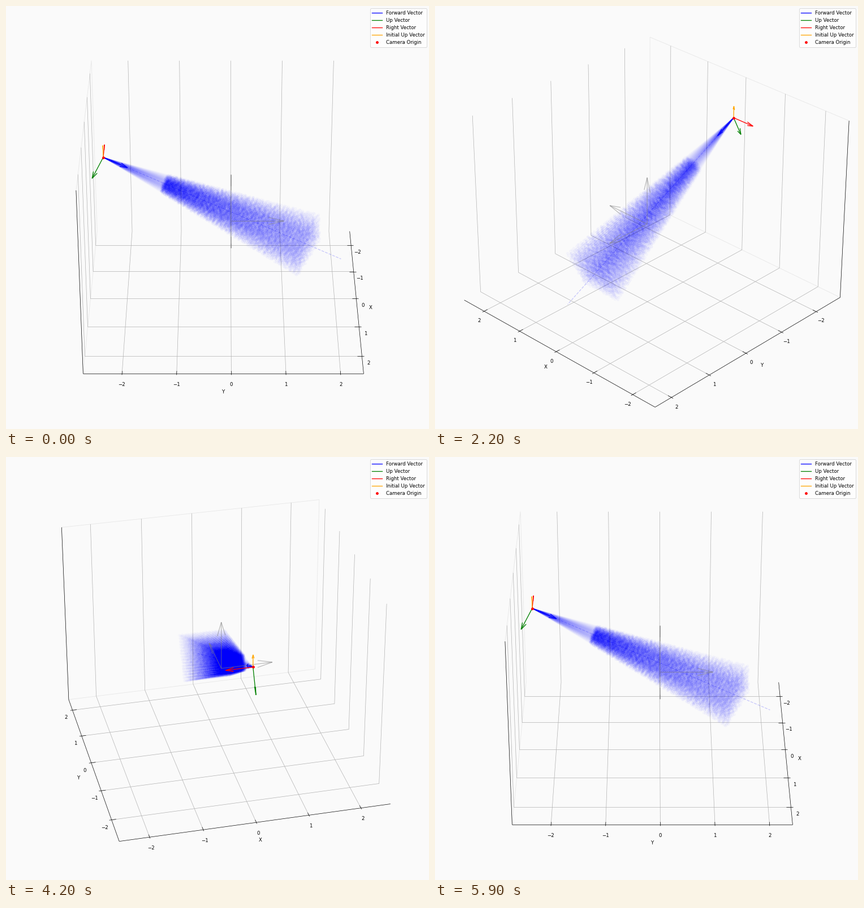
These frames come from a looping animation (748 px wide and 748 px high, 6 s). A matplotlib script:

```python
import numpy as np
import matplotlib.pyplot as plt
from matplotlib.animation import FuncAnimation
from matplotlib.collections import LineCollection

SIZE, FRAMES = 748, 60
plt.rcParams["font.family"] = "DejaVu Sans"

# View: perspective camera circling the plot box at a fixed elevation
ELEV = np.radians(30)
SCREEN = np.array([384.4, 365])
UNIT, DIST, FOCAL = 0.2415, 10, 3879
CENTER = np.array([0.005, -0.145, 0.19])
HALF = np.array([2.567, 2.567, 1.9255])
TICKS = range(-2, 3)
TICK_PAD, LABEL_PAD = 0.025, 0.0544

# Scene: a pinhole camera with its axes
ORIGIN = np.array([0, -2.381, 1.37])
FORWARD = np.array([0, 0.897, -0.442])
RIGHT = np.array([-1.0, 0, 0])
UP = np.array([0, -0.442, -0.897])
NEAR, FAR, SPREAD = 1.25, 4.3, 0.105
GRID, SAMPLES, BANDS = 16, 64, 4


def project(points, azim):
    """Return pixel positions and the distance from the viewer."""
    q = (np.asarray(points, float) - CENTER) * UNIT
    ca, sa = np.cos(azim), np.sin(azim)
    front = q[..., 0] * ca + q[..., 1] * sa
    right = q[..., 1] * ca - q[..., 0] * sa
    up = q[..., 2] * np.cos(ELEV) - front * np.sin(ELEV)
    depth = DIST - front * np.cos(ELEV) - q[..., 2] * np.sin(ELEV)
    xy = np.stack([right, -up], -1) * (FOCAL / depth)[..., None]
    return SCREEN + xy, depth


def arrow(start, vec):
    """Shaft and two head strokes, as three segments."""
    vec = np.asarray(vec, float)
    tip = start + vec
    flat = np.hypot(vec[0], vec[1])
    axis = np.array([vec[1], -vec[0], 0]) / flat if flat else np.array([0, 1.0, 0])
    side = np.cross(axis, vec)
    c, s = np.cos(np.radians(15)), np.sin(np.radians(15))
    heads = [tip - 0.3 * (c * vec + k * s * side) for k in (1, -1)]
    return np.array([[start, tip], [tip, heads[0]], [tip, heads[1]]])


def make_rays():
    """Ray segments up to the near plane and jittered samples beyond it."""
    rng = np.random.default_rng(0)
    a = np.linspace(-SPREAD, SPREAD, GRID)
    u, v = (g.ravel()[:, None] for g in np.meshgrid(a, a))
    dirs = FORWARD + u * RIGHT + v * UP
    step = np.arange(SAMPLES) + rng.random((len(dirs), SAMPLES))
    t = NEAR + step / SAMPLES * (FAR - NEAR)
    samples = ORIGIN + dirs[:, None, :] * t[..., None]
    starts = np.broadcast_to(ORIGIN, dirs.shape)
    return np.stack([starts, ORIGIN + NEAR * dirs], 1), samples.reshape(-1, 3)


fig = plt.figure(figsize=(12, 12), dpi=SIZE / 12, facecolor="#fafafa")
ax = fig.add_axes([0, 0, 1, 1])
ax.set(xlim=(0, SIZE), ylim=(SIZE, 0))
ax.axis("off")


def lines(color, width, zorder, alpha=None, style="-"):
    coll = LineCollection([], colors=color, linewidths=width, zorder=zorder,
                          alpha=alpha, linestyles=style)
    ax.add_collection(coll, autolim=False)
    return coll


pane = lines("#e6e6e6", 0.9, 1)
grid = lines("#b0b0b0", 0.8, 1.1)
spines = lines("black", 0.8, 1.2)
tick_marks = lines("black", 0.8, 1.3)
tick_texts = [[ax.text(0, 0, str(v).replace("-", "\u2212"), ha="center",
                       va="top", fontsize=10) for v in TICKS] for _ in "XY"]
axis_names = [ax.text(0, 0, s, ha="center", va="center", fontsize=10) for s in "XY"]

ray_segs, samples = make_rays()
rays = lines("blue", 1.5, 4, 0.02)
axis_ray = lines("blue", 1.5, 4.1, 0.2, "--")
axis_segs = np.array([[ORIGIN, ORIGIN + 5 * FORWARD]])

# Samples nearer to the viewer are more opaque
clouds = [ax.plot([], [], "o", color="blue", ms=20 ** 0.5, mew=1.5, zorder=5,
                  alpha=alpha)[0] for alpha in np.linspace(0.021, 0.012, BANDS)]

arrows = [(lines("gray", 1.5, 6, 0.5), arrow(np.zeros(3), v)) for v in np.eye(3)]
for color, vec in (("blue", FORWARD / 2), ("green", UP / 2),
                   ("red", RIGHT / 2), ("orange", [0, 0, 0.25])):
    arrows.append((lines(color, 1.5, 7), arrow(ORIGIN, vec)))
dot, = ax.plot([], [], "o", color="red", ms=20 ** 0.5, mew=1, zorder=8)

handles = [plt.Line2D([], [], color=c, lw=1.5)
           for c in ("blue", "green", "red", "orange")]
ax.legend(handles + [dot],
          ["Forward Vector", "Up Vector", "Right Vector",
           "Initial Up Vector", "Camera Origin"],
          loc="upper right", fontsize=10, labelspacing=0.47).set_zorder(10)


def draw_box(azim):
    eye = np.array([np.cos(azim), np.sin(azim), 1])
    back = np.where(eye > -1e-9, -1, 1)
    front = -back

    def corner(x, y, z):
        return CENTER + HALF * [x, y, z]

    fx, fy = front[:2]
    bx, by = back[:2]
    rect = [corner(x, by, z) for x, z in ((fx, -1), (fx, 1), (bx, 1), (bx, -1), (fx, -1))]
    pane.set_segments([project(rect, azim)[0]])
    edges = [[corner(-1, fy, -1), corner(1, fy, -1)],
             [corner(fx, -1, -1), corner(fx, 1, -1)],
             [corner(fx, by, -1), corner(fx, by, 1)]]
    spines.set_segments(project(edges, azim)[0])

    grid_segs, marks = [], []
    for k in (0, 1):
        j = 1 - k
        outward = np.zeros(3)
        outward[j] = front[j] * 2 * HALF[j]
        away = outward - [0, 0, 2 * HALF[2]]
        base = corner(fx, fy, -1)
        base[k] = CENTER[k]
        axis_names[k].set_position(project(base + LABEL_PAD * away, azim)[0])
        for value, text in zip(TICKS, tick_texts[k]):
            p = base.copy()
            p[k] = value
            low = p - outward
            grid_segs.append([p, low, low + [0, 0, 2 * HALF[2]]])
            marks.append([p + outward / 120, p - outward / 60])
            text.set_position(project(p + TICK_PAD * away, azim)[0])
    grid.set_segments(project(grid_segs, azim)[0])
    tick_marks.set_segments(project(marks, azim)[0])


def update(i):
    azim = 2 * np.pi * i / (FRAMES - 1)
    draw_box(azim)
    rays.set_segments(project(ray_segs, azim)[0])
    axis_ray.set_segments(project(axis_segs, azim)[0])
    for coll, segs in arrows:
        coll.set_segments(project(segs, azim)[0])
    dot.set_data(*project(ORIGIN[None], azim)[0].T)

    xy, depth = project(samples, azim)
    level = (depth - depth.min()) / np.ptp(depth)
    band = np.minimum((level * BANDS).astype(int), BANDS - 1)
    for k, cloud in enumerate(clouds):
        cloud.set_data(*xy[band == k].T)


anim = FuncAnimation(fig, update, frames=FRAMES, interval=100, repeat=True,
                     repeat_delay=0, blit=False)
plt.show()
```
